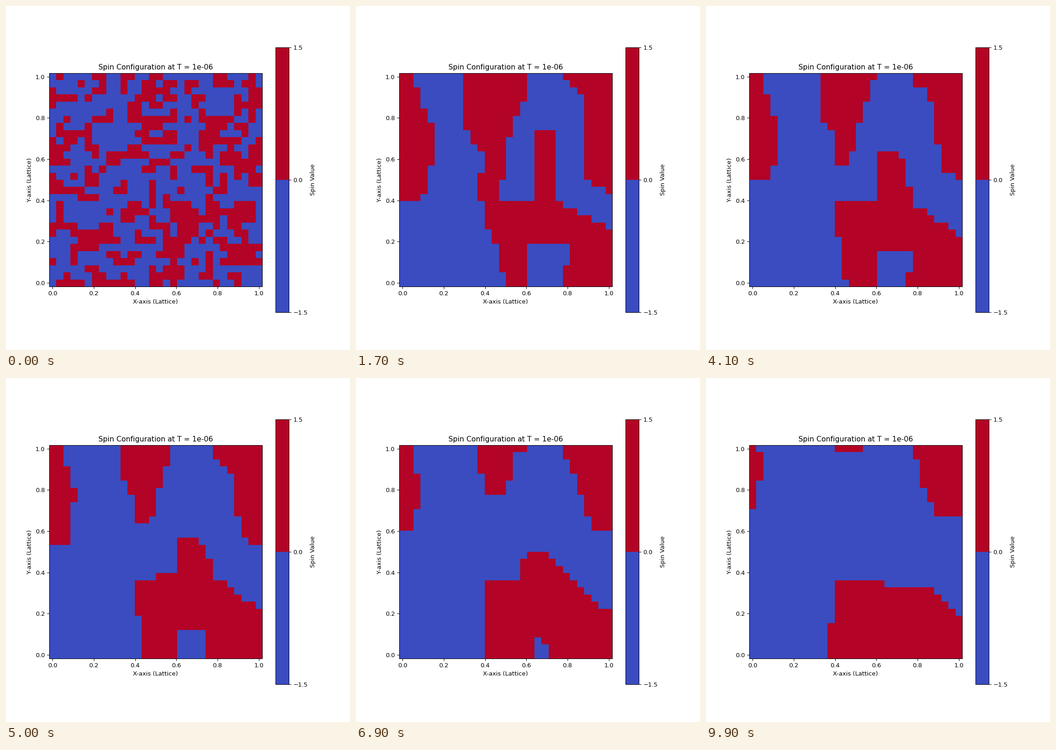
Recreate the animation shown at these times as a matplotlib script. Size 748 by 748 pixels, loop 10000 ms.

```python
import numpy as np
import matplotlib.pyplot as plt
from matplotlib.animation import FuncAnimation
from matplotlib.colors import BoundaryNorm
from matplotlib.path import Path

N = 30          # lattice side
FRAMES = 100
SETTLE = 17     # frames until the noise has become clean domains
rng = np.random.default_rng(7)

# Up-spin domains in cells, rows counted from the top: corners once
# settled, and where the same corners have moved to at the end.
LEFT = ([(0, 0), (1.5, 0), (5, 8), (4, 18), (0, 18)],
        [(0, 0), (2, 0), (1.5, 5), (1, 9), (0, 9)])
MIDDLE = ([(9, 0), (18.5, 0), (15, 10), (14, 19), (10.5, 17), (12, 12), (8.5, 7)],
          [(12, 0), (16, 0), (16, 1), (14, 1), (13, 1), (12.5, 1), (12, 1)])
RIGHT = ([(22, 0), (26, 3), (26.5, 15), (30, 17), (30, 0)],
         [(23, 0), (25, 8), (28, 11), (30, 9.5), (30, 0)])
HILL = ([(15, 30), (11.5, 18), (18.5, 18), (19, 8), (22, 8), (22, 18),
         (30, 22), (30, 30), (23, 30), (24, 24), (18, 24), (18, 30)],
        [(11, 30), (12, 19.5), (16, 19), (17, 19), (20, 19.8), (26, 20.2),
         (30, 25), (30, 30), (20, 30), (20, 29), (19, 29), (19, 30)])

cells = np.arange(N) + 0.5
centres = np.column_stack([g.ravel() for g in np.meshgrid(cells, cells)])


def neighbours(a):
    """Sum of the four neighbours on the periodic lattice."""
    return sum(np.roll(a, s, axis) for axis in (0, 1) for s in (-1, 1))


def domains(u):
    """Spins of the domains, moved a share u of their way."""
    up = np.zeros(N * N, bool)
    for start, end in (LEFT, MIDDLE, RIGHT, HILL):
        corners = (1 - u) * np.array(start) + u * np.array(end)
        up |= Path(corners).contains_points(centres)
    return np.where(up, 1.0, -1.0).reshape(N, N)


def history():
    """Noise coarsens into domains whose corners keep flickering."""
    noise = rng.normal(size=(N, N))
    drift = np.zeros((N, N))
    states = []
    for i in range(FRAMES):
        noise += 0.2 * neighbours(noise)
        noise /= noise.std()
        drift = 0.8 * drift + 0.08 * rng.normal(size=(N, N))
        shape = domains(max(0, i - SETTLE) / (FRAMES - 1 - SETTLE))
        pull = (shape + neighbours(shape)) / 5
        heat = 0.85 * max(0, 1 - i / SETTLE) ** 1.5
        field = heat * noise + (1 - heat) * (pull + drift)
        states.append(np.where(field > 0, 1, -1))
    return states


states = history()

fig, ax = plt.subplots(figsize=(8, 8), dpi=93.5)
half = 0.5 / (N - 1)
image = ax.imshow(states[0], cmap=plt.get_cmap("coolwarm", 2),
                  norm=BoundaryNorm([-1.5, 0, 1.5], 2),
                  extent=(-half, 1 + half, -half, 1 + half),
                  interpolation="nearest")
fig.colorbar(image, ax=ax, label="Spin Value", ticks=[-1.5, 0, 1.5])
ax.set_title("Spin Configuration at T = 1e-06")
ax.set_xlabel("X-axis (Lattice)")
ax.set_ylabel("Y-axis (Lattice)")


def update(i):
    image.set_data(states[i])
    return [image]


anim = FuncAnimation(fig, update, frames=FRAMES, interval=100,
                     repeat=True, repeat_delay=0)
plt.show()
```
